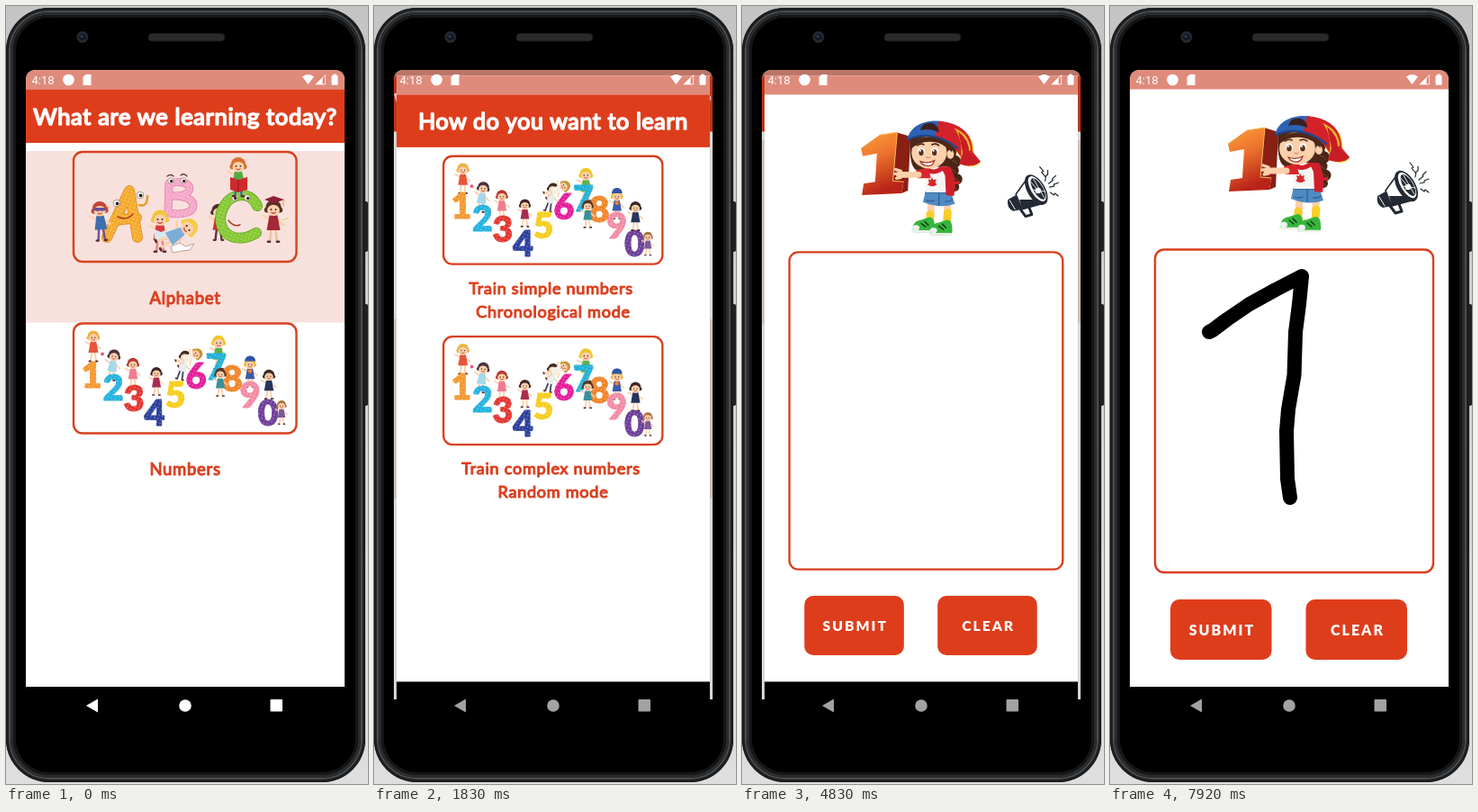
Recreate the animation shown at these times as an HTML page. Size 402 px wide and 864 px high, loop 8 s.

```html
<!DOCTYPE html>
<html lang="en">
<head>
<meta charset="utf-8">
<title>Learning app</title>
<style>
html, body { margin: 0; width: 100%; height: 100%; overflow: hidden; background: #cfcfcf; }
svg { display: block; width: 402px; height: 864px; }
text { stroke-linejoin: round; }
.head { font: 400 25.5px Lato, sans-serif; fill: #fff; stroke: #fff; stroke-width: 1.7; letter-spacing: .65px; text-anchor: middle; }
.label { font: 400 18.5px Lato, sans-serif; fill: #dc3f1e; stroke: #dc3f1e; stroke-width: 1.1; letter-spacing: .7px; text-anchor: middle; }
.btn { font: 900 16px Lato, sans-serif; fill: #fff; letter-spacing: 2px; text-anchor: middle; }
.digit { font: 900 40px Lato, sans-serif; text-anchor: middle; stroke-width: .8; }
.clock { font: 13px Roboto, sans-serif; fill: #fff; }
.line { fill: none; stroke-linecap: round; stroke-linejoin: round; }
</style>
</head>
<body>
<svg id="stage" viewBox="0 0 402 864"></svg>
<script>
const LOOP = 8000, RED = '#de3d1c', PINK = '#f8e1dc', SKIN = '#fbd0ab';
const $ = id => document.getElementById(id);
const clamp = v => Math.max(0, Math.min(1, v));
const ramp = (t, a, b) => clamp((t - a) / (b - a));

// Shape helpers
const rect = (x, y, w, h, fill, r = 0, more = '') =>
  `<rect x="${x}" y="${y}" width="${w}" height="${h}" rx="${r}" fill="${fill}" ${more}/>`;
const disc = (x, y, r, fill, ry = r, more = '') =>
  `<ellipse cx="${x}" cy="${y}" rx="${r}" ry="${ry}" fill="${fill}" ${more}/>`;
const area = (d, fill, more = '') => `<path d="${d}" fill="${fill}" ${more}/>`;
const line = (d, color, w, more = '') =>
  `<path class="line" d="${d}" stroke="${color}" stroke-width="${w}" ${more}/>`;
const text = (kind, x, y, s) => `<text class="${kind}" x="${x}" y="${y}">${s}</text>`;
const at = (x, y, s, body, turn = 0) =>
  `<g transform="translate(${x} ${y}) rotate(${turn}) scale(${s})">${body}</g>`;
const frame = (x, y, w, h) => rect(x, y, w, h, 'none', 10, 'stroke="#d8401f" stroke-width="2.4"');

// Small child, the head centred on the origin
function kid(x, y, s, hair, shirt, legs = SKIN, turn = 0) {
  return at(x, y, s,
    disc(-4.8, 1, 2, hair) + disc(4.8, 1, 2, hair) + disc(0, -1, 5.8, hair, 5.4) +
    line('M-1.6 15 L-2.6 24 M1.6 15 L2.6 24', legs, 1.8) +
    line('M-2.6 24.5 h-1.5 M2.6 24.5 h1.5', '#5b3030', 1.7) +
    line('M-2.5 8 L-8 5 M2.5 8 L7.5 12', SKIN, 1.6) +
    area('M-3 5 H3 L5 16 H-5 Z', shirt) +
    disc(0, 1.2, 4.6, SKIN, 4.1) +
    disc(-1.7, .6, .65, '#3b2521') + disc(1.7, .6, .65, '#3b2521') +
    line('M-1.5 2.8 Q0 4.2 1.5 2.8', '#c9483a', .8), turn);
}

function numbersArt() {
  const digits = [
    [1, 95, 233, '#f4972f'], [2, 119, 247, '#22b2df'], [3, 142, 259, '#e2352f'],
    [4, 165, 275, '#2a3e9b'], [5, 188, 255, '#f6cd1c'], [6, 211, 234, '#e41b98'],
    [7, 233, 224, '#1fb0d7'], [8, 251, 237, '#ef8427'], [9, 271, 255, '#f38aa4'],
    [0, 291, 275, '#6c3d98']];
  const back = kid(97, 177, 1.1, '#f0b040', '#e8543c') + kid(120, 198, 1.1, '#4b3340', '#a8d8ea', SKIN, 8) +
    kid(141, 207, 1.05, '#b53a2c', '#ee7d92') + kid(199, 199, 1.05, '#3a2b28', '#e9ecef', '#444a5c', 14) +
    kid(212, 196, 1, '#c79434', '#f4f1e4', SKIN, 65) + kid(236, 183, 1.2, '#f0c52c', '#5cb24c') +
    kid(271, 207, 1.05, '#efb53a', '#3c5da8') + area('M265 204 q1-7 7-6 q5 1 5 6 Z', '#2f55a4');
  const front = kid(167, 217, 1, '#3d2528', '#a72c52') + kid(238, 218, 1, '#5a3524', '#3a8f9b') +
    kid(292, 220, 1.05, '#3c2a28', '#27345f') + kid(306, 253, .85, '#a8743f', '#7b5a96');
  return back + digits.map(([n, x, y, c]) =>
    `<text class="digit" x="${x}" y="${y}" fill="${c}" stroke="${c}">${n}</text>` +
    `<text class="digit" x="${x}" y="${y}" fill="url(#dots)">${n}</text>`).join('') +
    front + disc(107, 196, 2, '#f05a7a') + disc(271, 215, 2.3, '#ef7d2a');
}

function eye(x, y, r) {
  return disc(x, y, r, '#fff', r, 'stroke="#7a5a4a" stroke-width=".6"') + disc(x + .6, y + .4, r * .5, '#2a2320');
}

function lettersArt() {
  const big = (d, c, w, edge) => line(d, edge, w + 1.4) + line(d, c, w) + line(d, 'url(#dots)', w);
  return kid(236, 228, 1.3, '#4a2d25', '#cf2c35', '#5a3040') +
    big('M181 197 L180 228 M181 197 C210 190 211 212 186 211 C217 210 215 236 182 230', '#f5a7c8', 7.5, '#dd79a8') +
    line('M179 189 q4-3 7 0 M194 188 q4-3 7 1', '#5b3a35', 1.3) + eye(183, 194, 3.2) + eye(197, 194, 3.2) +
    big('M112 257 L137 205 L146 257 M122 238 L145 235', '#f5aa2c', 10.5, '#dd8419') +
    line('M148 221 Q157 224 157 211', '#e89b22', 2.5) + line('M113 224 Q103 228 101 220', '#e89b22', 2.5) +
    eye(123, 219, 3.8) + eye(149, 210, 3.8) + line('M124 234 Q134 239 141 231', '#a93a24', 1.4) +
    kid(104, 226, 1.4, '#c74436', '#3e6fae', '#75539a', -4) + rect(97, 224, 14, 3.5, '#6a4f9a', 2) +
    big('M279 222 C271 204 246 206 239 230 C234 252 254 266 278 252', '#86c832', 10.5, '#5ba01f') +
    eye(254, 213, 3.2) + eye(268, 213, 3.2) + line('M247 238 Q253 246 260 243', '#a93a24', 1.4) +
    kid(171, 236, 1.5, '#f2c53f', '#d93a3e', '#eb8694') + area('M165 248 l7 3 8-3 v11 l-8 2-7-2Z', '#d8e8ee') +
    kid(203, 246, 1.6, '#f5cb45', '#7aaed6', SKIN, 60) +
    area('M183 267 l10-4 6 4 10-3 -5 7-8 1-11 2Z', '#fff', 'stroke="#b58a80" stroke-width=".8"') +
    kid(258, 177, 1.4, '#d9702a', '#55a944', '#3f6f9f') +
    area('M249 190 l9 3 10-3 v14 l-10 3-9-3Z', '#cf2a2d') + line('M258 193 v13', '#8d1920', 1) +
    kid(297, 225, 1.5, '#5a3026', '#a52838', '#efc29f') +
    area('M287 215 l10-4 12 4 -11 4Z', '#8c1f37') + line('M308 215 v7', '#e0a83a', 1.2) +
    line('M307 238 l7-3', '#fff4d0', 3) + line('M307 238 l7-3', '#b68a60', .7);
}

function girlArt() {
  const one = 'M131 153 L152 138 L172 135 L167 190 L179 191 L177 204 L132 206 L134 193 L147 191 L149 159 L133 162 Z';
  const shoe = (x, y) => area(`M${x} ${y} q1-9 10-10 l9-3 q7 0 6 14 l-2 3 h-21 Z`, '#36b53c') +
    line(`M${x} ${y + 3} h23`, '#e9efe6', 2.6) + disc(x + 4, y - 1, 4, '#eef2ee', 3.2) +
    line(`M${x + 10} ${y - 6} l5 4 M${x + 14} ${y - 8} l4 4`, '#16351a', 1.5);
  return area('M171 135 L187 140 L184 201 L177 204 L179 191 L167 190 Z', '#8a1f14') +
    area(one, 'url(#fire)') + line('M152 138 L172 135 L167 190 L179 191', '#f9bc58', 1) +
    area('M187 136 Q184 174 194 178 L229 177 Q243 163 238 142 Z', '#4e2718') +
    [[237, 168, 7], [235, 178, 6.5], [239, 188, 6.5], [237, 197, 5]].map(([x, y, r]) =>
      disc(x, y, r, '#4a2518') + line(`M${x - 4} ${y - 2} q5 1 7 5`, '#7b4a2c', 1)).join('') +
    line('M233 192 h8', '#d9262b', 3) +
    line('M210 214 L210 230 M229 214 L228 231', SKIN, 8) +
    line('M209 228 L209 238 M229 226 L228 237', '#f7cf28', 9) + shoe(189, 244) + shoe(209, 247) +
    area('M204 201 H232 L237 216 Q220 222 201 214 Z', '#4f8bc0') +
    line('M204 203 H232 M219 204 v13 M205 212 q5 2 9 0 M226 213 q5 1 8-2', '#2c5f96', 1.3) +
    area('M203 174 L229 174 L233 203 H204 Z', '#f7f5f3') +
    area('M221 174 L232 174 Q240 188 236 207 L227 206 L226 184 Z', '#cf1f2a') +
    area('M205 173 Q213 181 221 173 L224 178 Q212 186 203 178 Z', '#cf1f2a') +
    area('M211 186 l2 3 3-1 -1 4 2 2 -4 2 h-3 l-4-2 2-2 -1-4 3 1Z', '#d9262b') +
    area('M193 178 L207 175 L210 187 L195 187 Z', '#d9262b') +
    line('M196 183 L174 183', SKIN, 7) + line('M176 179 L170 177 M175 182 L169 182 M176 186 L171 187', SKIN, 3.4) +
    disc(208, 158, 20, SKIN, 18) + disc(232, 160, 4, SKIN, 5) +
    area('M187 154 Q193 139 213 140 Q232 142 234 158 Q224 147 213 146 Q198 144 187 154 Z', '#4e2718') +
    disc(199, 157, 4, '#fff', 5) + disc(214, 157, 4, '#fff', 5) +
    disc(199, 158, 2.8, '#5c321c', 3.6) + disc(214, 158, 2.8, '#5c321c', 3.6) +
    disc(198, 156, 1, '#fff') + disc(213, 156, 1, '#fff') +
    line('M194 150 q5-3 8-1 M211 149 q5-2 8 1', '#4e2718', 1.6) +
    area('M198 168 Q207 171 214 167 Q212 174 205 173 Q200 172 198 168 Z', '#fff', 'stroke="#a33328" stroke-width="1.2"') +
    line('M205 163 q2 2 4 0', '#d99671', 1.3) +
    area('M232 127 Q261 134 258 161 L266 169 Q261 176 249 173 L239 157 Z', '#f2ce35') +
    area('M183 143 Q188 124 213 122 Q237 122 245 142 L240 153 Q215 132 183 143 Z', '#2d63b5') +
    area('M219 122 Q257 126 257 157 L266 168 Q257 176 242 171 L244 163 Q233 145 215 139 Z', '#d4222a') +
    area('M236 130 Q254 137 255 155 L244 163 Q246 142 236 130 Z', '#e5b72b') +
    area('M241 134 Q254 145 253 158 L266 168 Q259 176 243 170 L246 158 Z', '#c91d26') +
    area('M198 133 Q200 123 212 125 Q219 128 219 135 Q208 130 198 133 Z', '#3b211b') +
    line('M184 143 Q213 131 240 153', '#1f478a', 2.4);
}

function hornArt() {
  const ink = '#232a33';
  return area('M297 211 L306 206 L313 222 L303 224 Q295 220 297 211 Z', ink) +
    area('M306 205 L319 187 L335 216 L313 222 Z', '#fff', `stroke="${ink}" stroke-width="1.6"`) +
    area('M310 211 L331 211 L335 216 L313 222 Z', ink) +
    disc(329, 200, 10, ink, 19, 'transform="rotate(-31 329 200)"') +
    disc(330, 199, 7, '#fff', 16, 'transform="rotate(-31 330 199)"') +
    disc(331, 199, 5.4, ink, 13.5, 'transform="rotate(-31 331 199)"') +
    line('M322 190 L333 203 M326 188 L338 209 M325 200 L339 202', '#e3e6e8', 1) + disc(331, 201, 3.3, '#fff') +
    line('M311 222 L317 230 L324 228 L321 220', ink, 3) + line('M299 212 L305 222', '#fff', 1) +
    line('M333 174 l4 5 -2 1 4 5 M342 178 l0 5 -2 1 -1 6 M351 184 l-4 4 1 1 -5 4 M354 192 l-5 2 0 2 -5 1 M354 207 l-4-3 -1 2 -4-3', ink, 1.2);
}

// Screens
const backdrop = rect(22, 71, 354, 685, '#fff') + rect(22, 756, 354, 43, '#000');
const status = rect(22, 71, 354, 21.5, '#df8b7b');
const titled = s => status + rect(22, 92.5, 354, 59.5, RED) + text('head', 199, 131.5, s);
const card = (y, art) => frame(75, y, 247.5, 122) + `<use href="#${art}" y="${y - 162}"/>`;
const button = (x, s) => rect(x, 659, 112.5, 67, RED, 10) + text('btn', x + 57.5, 699, s);

const topics = backdrop + rect(22, 161, 354, 190.5, PINK, 0, 'id="rowA"') +
  rect(22, 351.5, 354, 190.5, PINK, 0, 'id="rowB"') + titled('What are we learning today?') +
  card(162, 'letters') + text('label', 199, 331, 'Alphabet') +
  card(352.5, 'numbers') + text('label', 199, 521, 'Numbers');
const modes = backdrop + rect(22, 161, 354, 195, PINK, 0, 'id="rowC"') + titled('How do you want to learn') +
  card(162, 'numbers') + text('label', 196.5, 318, 'Train simple numbers') + text('label', 199, 344, 'Chronological mode') +
  card(366, 'numbers') + text('label', 196.5, 522, 'Train complex numbers') + text('label', 199, 548, 'Random mode');
const draw = backdrop + status + girlArt() + hornArt() + frame(50, 270.5, 309, 358.5) +
  button(67, 'SUBMIT') + button(217.5, 'CLEAR') + line('', '#000', 16, 'id="ink"');
const shade = n => rect(22, 71, 354, 685, '#000', 0, `id="shade${n}" opacity="0"`);

const ring = (inset, color, w) =>
  rect(inset, inset + 2, 399 - 2 * inset, 860 - 2 * inset, 'none', 48 - inset, `stroke="${color}" stroke-width="${w}"`);
const phone = rect(0, 0, 402, 864, 'url(#wall)') +
  rect(396, 217, 6, 56, '#202224', 2) + rect(396, 331, 6, 113, '#202224', 2) +
  rect(0, 2, 399, 860, '#000', 48) + ring(1.5, '#1c1e1f', 3) + ring(4, '#4a4d50', 2) +
  ring(6.5, '#2a2c2e', 3) + ring(9.5, '#151617', 3) +
  rect(158, 30.5, 85, 8.5, '#292a2c', 4, 'stroke="#17181a"') +
  disc(85, 34.5, 6.5, '#25282d') + disc(85, 34.5, 3.8, '#111827') + disc(84.3, 33.6, 1.4, '#35456a');

const icons = text('clock', 28.5, 87, '4:18') + disc(69.5, 82, 6.3, '#fff') +
  area('M88.5 76 H94.5 V88 H85.5 V79 Z', '#fff') +
  area('M329 78.5 Q335.5 73.5 342 78.5 L335.5 87 Z', '#fff') +
  area('M344 87 L351.5 79.5 V87 Z', '#fff') +
  line('M344.5 86.6 L354.6 76.7 V86.6 Z', '#fff', .8) +
  rect(361.5, 77, 7, 10.7, '#fff', 1) + rect(363.4, 75.6, 3.2, 2, '#fff');
const nav = '<g id="nav"><path d="M89 777 L102 769.5 V784.5 Z"/><circle cx="199" cy="777" r="6.8"/>' +
  '<rect x="293.5" y="770" width="13.5" height="13.5" rx="1"/></g>';

$('stage').innerHTML = `<defs>
  <pattern id="dots" width="4" height="4" patternUnits="userSpaceOnUse" patternTransform="rotate(20)">
    <circle cx="2" cy="2" r=".75" fill="#fff" opacity=".55"/></pattern>
  <linearGradient id="fire" x2=".3" y2="1"><stop stop-color="#f8a136"/>
    <stop offset=".45" stop-color="#ed742e"/><stop offset="1" stop-color="#b92318"/></linearGradient>
  <linearGradient id="wall" x2="0" y2="1"><stop stop-color="#c4c4c4"/><stop offset="1" stop-color="#dedede"/></linearGradient>
  <clipPath id="glass"><path d="M22 799 V83 Q22 71 34 71 H364 Q376 71 376 83 V799 Z"/></clipPath>
  <g id="letters">${lettersArt()}</g><g id="numbers">${numbersArt()}</g></defs>
  ${phone}<g clip-path="url(#glass)">
  <g id="win0">${topics}${shade(0)}</g><g id="win1">${modes}${shade(1)}</g><g id="win2">${draw}</g>
  ${icons}${nav}</g>`;

// Fast start and a very slow settling, built from two joined cubics
function settle(p) {
  const [x0, y0, x1, y1, x2, y2, x3, y3] = p < 1 / 6
    ? [0, 0, .05, 0, .1333, .06, 1 / 6, .4]
    : [1 / 6, .4, .2083, .82, .25, 1, 1, 1];
  const bez = (u, a, b, c, d) => (1 - u) ** 3 * a + 3 * (1 - u) ** 2 * u * b + 3 * (1 - u) * u * u * c + u ** 3 * d;
  let lo = 0, hi = 1;
  for (let i = 0; i < 20; i++) {
    const mid = (lo + hi) / 2;
    if (bez(mid, x0, x1, x2, x3) < p) lo = mid; else hi = mid;
  }
  return bez(lo, y0, y1, y2, y3);
}

const opens = [-Infinity, 1690, 4690];
const OPEN = 400;
const trace = [
  [5830, 110, 362], [6000, 114, 360], [6170, 130, 348], [6330, 155, 331], [6500, 184, 315],
  [6670, 213, 300], [6830, 210, 331], [6920, 206, 362], [7000, 204.5, 410], [7170, 198, 448],
  [7330, 196, 472], [7500, 197, 525], [7670, 200, 546]];

function inkPath(t) {
  if (t < trace[0][0]) return '';
  let d = `M${trace[0][1]} ${trace[0][2]} l.01 0`;
  for (let i = 1; i < trace.length; i++) {
    const [ta, xa, ya] = trace[i - 1], [tb, xb, yb] = trace[i];
    const k = ramp(t, ta, tb);
    if (k > 0) d += ` L${xa + (xb - xa) * k} ${ya + (yb - ya) * k}`;
  }
  return d;
}

function render(t) {
  opens.forEach((start, i) => {
    const win = $('win' + i), next = opens[i + 1] ?? Infinity;
    const shown = t >= start && t < next + OPEN;
    win.style.display = shown ? '' : 'none';
    if (!shown) return;
    const entering = i ? settle(ramp(t, start, start + OPEN)) : 1;
    const leaving = t > next ? settle(ramp(t, next, next + OPEN)) : 0;
    const scale = .85 + .15 * entering + .05 * leaving;
    win.setAttribute('transform', `translate(199 435) scale(${scale}) translate(-199 -435)`);
    win.setAttribute('opacity', i ? ramp(t, start + 35, start + 85) : 1);
    if (i < 2) $('shade' + i).setAttribute('opacity', .18 * leaving);
  });
  const press = ramp(t, 1210, 1290);
  $('rowA').setAttribute('opacity', 1 - press);
  $('rowB').setAttribute('opacity', press);
  $('rowC').setAttribute('opacity', ramp(t, 4420, 4500));
  const grey = Math.round(255 - 93 * press);
  $('nav').setAttribute('fill', `rgb(${grey},${grey},${grey})`);
  $('ink').setAttribute('d', inkPath(t));
}

const begin = performance.now();
function tick() {
  render((performance.now() - begin) % LOOP);
  requestAnimationFrame(tick);
}
tick();
</script>
</body>
</html>
```
